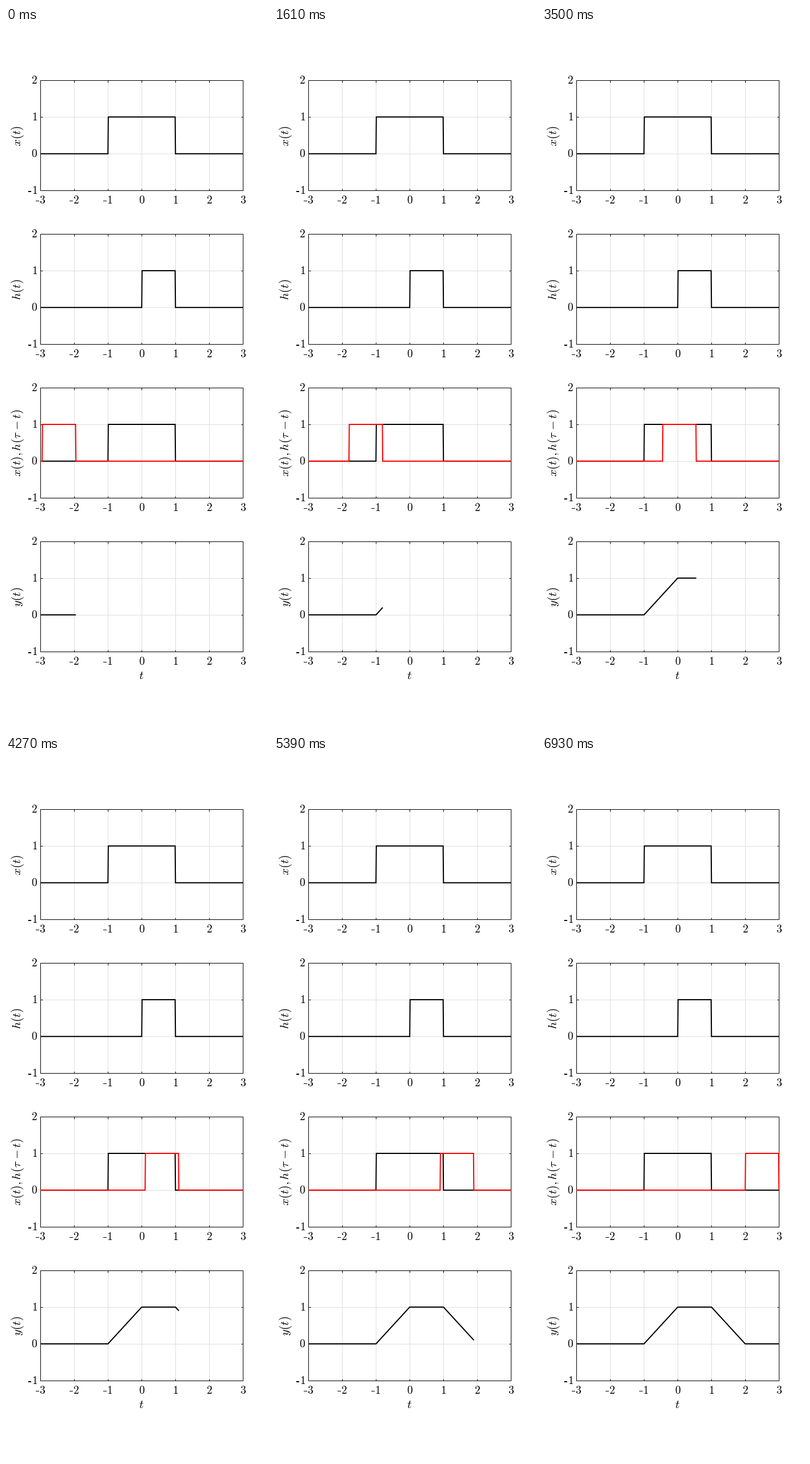
Write a matplotlib script that moves like this. It is 458 by 1222 pixels and loops after 7000 ms.

```python
import matplotlib.pyplot as plt
from matplotlib.animation import FuncAnimation
from matplotlib.patches import Rectangle

plt.rcParams["mathtext.fontset"] = "cm"

W, H, DPI = 458, 1222, 64
PT = 72 / DPI                      # points per pixel
LEFT, WIDTH = 60.25, 354
TOP, HEIGHT, PITCH = 91.0, 192.4, 267.93
TICK, LABEL = 19.4, 21.2           # font sizes in pixels
FRAMES, INTERVAL = 100, 70
DT = 0.01                          # sampling step, gives edges a slight slant

fig = plt.figure(figsize=(W / DPI, H / DPI), dpi=DPI, facecolor="white")


def text(x, y, s, size, **kw):
    fig.text(x / W, 1 - y / H, s, fontsize=size * PT, ha="center",
             va="baseline", color="black", **kw)


def number(x, y, n):
    """Write a tick number with its digit centred on x, hyphen in front."""
    text(x, y, rf"$\mathrm{{{abs(n)}}}$", TICK)
    if n < 0:
        left = x - 0.572 * TICK
        fig.add_artist(Rectangle((left / W, 1 - (y - 0.187 * TICK) / H),
                                 0.265 * TICK / W, 0.066 * TICK / H,
                                 transform=fig.transFigure,
                                 facecolor="black", linewidth=0))


def panel(row, label):
    top = TOP + PITCH * row
    bottom = top + HEIGHT
    ax = fig.add_axes([LEFT / W, 1 - bottom / H, WIDTH / W, HEIGHT / H])
    ax.set(xlim=(-3, 3), ylim=(-1, 2), xticks=range(-3, 4), yticks=range(-1, 3))
    ax.set_axisbelow(True)
    ax.grid(color="#dedede", linewidth=PT)
    ax.tick_params(direction="in", length=3.5 * PT, width=PT, color="black",
                   top=True, right=True, labelbottom=False, labelleft=False)
    for spine in ax.spines.values():
        spine.set(linewidth=PT, color="black")
    for n in range(-3, 4):
        x = LEFT + (n + 3) * WIDTH / 6
        number(x + (0.167 * TICK if n < 0 else 0), bottom + 22.6, n)
    for n in range(-1, 3):
        number(54.5 - 0.25 * TICK, top + (2 - n) * HEIGHT / 3 + 6, n)
    text(25.8, (top + bottom) / 2 + 0.5, f"${label}$", LABEL,
         rotation=90, rotation_mode="anchor")
    return ax


def pulse(a, b):
    """Rectangular pulse of height 1 between a and b over the whole axis."""
    return [-3, a, a + DT, b - DT, b, 3], [0, 0, 1, 1, 0, 0]


def trace(ax, xs=(), ys=(), color="black"):
    line, = ax.plot(xs, ys, color=color, linewidth=2 * PT, zorder=3,
                    clip_on=False, solid_capstyle="butt",
                    solid_joinstyle="miter", snap=False)
    return line


def overlap(t):
    return max(0, min(t, 1) - max(t - 1, -1))


trace(panel(0, "x(t)"), *pulse(-1, 1))
trace(panel(1, "h(t)"), *pulse(0, 1))
both = panel(2, r"x(t),h(\tau\hspace{0.113}-t)")
trace(both, *pulse(-1, 1))
window = trace(both, color="red")
output = trace(panel(3, "y(t)"))
text(LEFT + WIDTH / 2 - 0.5, 1135.2, "$t$", LABEL)


def update(i):
    t = -1.95 + 0.05 * i
    window.set_data(*pulse(t - 1, t))
    ts = [-3] + [k for k in (-1, 0, 1, 2) if k < t - 1e-6] + [t]
    output.set_data(ts, [overlap(s) for s in ts])
    return window, output


anim = FuncAnimation(fig, update, frames=FRAMES, interval=INTERVAL,
                     init_func=lambda: update(0), repeat=True,
                     repeat_delay=0, blit=False)
plt.show()
```
